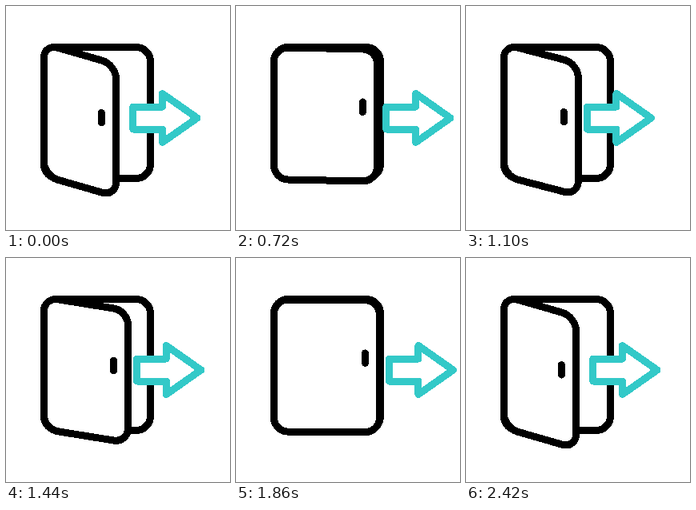
Write an HTML page that moves like this. It is 280 px wide and 280 px high and loops after 2820 ms.

```html
<!DOCTYPE html>
<html lang="en">
<head>
<meta charset="utf-8">
<title>Exit door</title>
<style>
  html, body { margin: 0; width: 100%; height: 100%; overflow: hidden; background: #fff; }
  svg { display: block; width: 100vw; height: 100vh; }
</style>
</head>
<body>
<svg viewBox="0 0 280 280" fill="#fff" stroke="#000" stroke-width="9" stroke-linecap="round" stroke-linejoin="round" shape-rendering="crispEdges">
  <rect x="47.3" y="51.5" width="133.2" height="164" rx="18"/>
  <path id="door"/>
  <path id="handle"/>
  <path id="arrow" stroke="#33c9c8" d="M158.8 126h36.7v-16.5L239 140l-43.5 30.5V154h-36.7z"/>
</svg>
<script>
const LOOP = 2820, SWING = 600, RADIUS = 18;
const LEFT = 47.3, TOP = 52.2, BOTTOM = 217.2;

const $ = id => document.getElementById(id);
const mix = (a, b, p) => a + (b - a) * p;
const between = (a, b, p) => a.map((v, i) => mix(v, b[i], p));

// Closed path through the corners, each rounded off at RADIUS along its sides.
function rounded(corners) {
  const n = corners.length;
  return corners.map((corner, i) => {
    const toward = (other, reach) =>
      between(corner, other, reach / Math.hypot(other[0] - corner[0], other[1] - corner[1]));
    const prev = corners[(i + n - 1) % n], next = corners[(i + 1) % n];
    const pull = RADIUS * 0.45;
    return `${i ? 'L' : 'M'}${toward(prev, RADIUS)}C${toward(prev, pull)} ${toward(next, pull)} ${toward(next, RADIUS)}`;
  }).join('') + 'Z';
}

function draw(t) {
  const time = Math.min(t, 4 * SWING);
  const open = (1 + Math.cos(Math.PI * time / SWING)) / 2;

  // Opening narrows the door and tilts it down to the right.
  const right = mix(180.5, 137.5, open), rise = 5 * open, drop = 21 * open;
  $('door').setAttribute('d', rounded([
    [LEFT, TOP - rise], [right, TOP + drop], [right, BOTTOM + drop], [LEFT, BOTTOM - rise]
  ]));
  $('handle').setAttribute('d', `M${right - 18} ${118.5 + 15 * open}v12.5`);

  // The arrow pulls back further between the two pushes than at rest.
  const middle = time > SWING && time < 3 * SWING;
  $('arrow').setAttribute('transform', `translate(${mix(33.3, middle ? -10.4 : 0, open)})`);
}

const start = performance.now();
function tick() {
  draw((performance.now() - start) % LOOP);
  requestAnimationFrame(tick);
}
tick();
</script>
</body>
</html>
```
